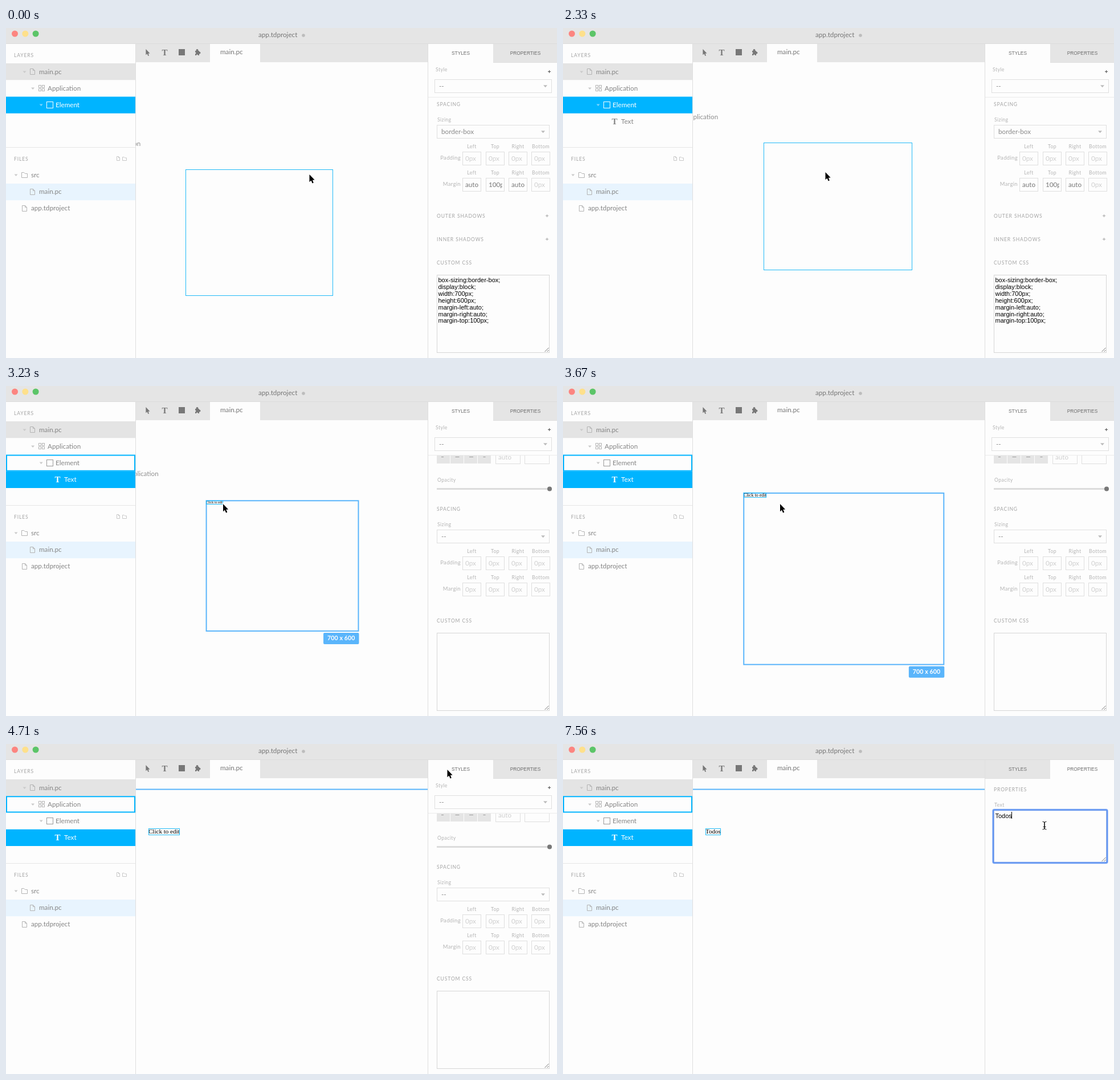
Animation, 967 px wide and 579 px high, one loop 8000 ms. Source, as an HTML page with a canvas:

```html
<!DOCTYPE html>
<html lang="en">
<head>
<meta charset="utf-8">
<title>Design editor</title>
<style>
html, body { margin: 0; width: 100%; height: 100%; overflow: hidden; background: #fdfdfd; }
canvas { display: block; }
</style>
</head>
<body>
<canvas id="stage" width="967" height="579"></canvas>
<script>
const c = document.getElementById('stage').getContext('2d');
const LOOP = 8000, TICK = 108;
const UI = 'Lato, "Open Sans", sans-serif';
const SANS = '"Liberation Sans", Arial, sans-serif';
const SERIF = '"Liberation Serif", Times, serif';
const BG = '#fdfdfd', BAR = '#e5e5e5', LINE = '#dfdfdf', INK = '#858585', PALE = '#b4b4b4';
const BLUE = '#00b4ff', PICK = '#22baf8', HOVER = '#5ab5fb';
const rowTop = i => 62 + 29.25 * i, ROW = 29.25;

// Moves: start, end, x, y
const pans = [[0, 0, 315, 248], [90, 90, 314, 250], [970, 1180, 352, 201]];
const pointerMoves = [
  [0, 0, 532, 257], [240, 440, 424, 344], [700, 700, 422, 343], [1800, 2150, 460, 253],
  [2590, 2590, 429, 254], [2740, 2740, 345, 193], [2840, 2940, 380.5, 207],
  [4370, 4710, 774, 45], [4890, 4890, 822, 49], [5040, 5130, 915, 59],
  [5490, 5690, 850, 135], [5780, 5780, 845, 143]
];

// Eased progress in screen refreshes; the first step shows at once
function progress(t, a, b) {
  if (t < a) return 0;
  if (t >= b) return 1;
  const n = Math.round((b - a) / TICK) + 1;
  const p = (Math.floor((t - a) / (b - a) * (n - 1)) + 1) / n;
  return p * p * (3 - 2 * p);
}

const pose = (moves, t) => moves.reduce(([x, y], [a, b, u, v]) => {
  const p = progress(t, a, b);
  return [x + (u - x) * p, y + (v - y) * p];
}, [0, 0]);

// The zoom grows around the pointer while the canvas drifts up and left
function view(t) {
  const [x, y] = pose(pans, t);
  const z = progress(t, 3230, 4030), q = progress(t, 4150, 4370), grow = 1.818 ** z;
  return {
    x: 380 + (x - 380) * grow - 102 * z * z + 23 * q,
    y: 207 + (y - 207) * grow - 46 * z * z - 2 * q,
    k: (t < 90 ? .37 : .373) * grow * (1 + .018 * q)
  };
}

function fill(x, y, w, h, color) {
  c.fillStyle = color;
  c.fillRect(x, y, w, h);
}

function box(x, y, w, h, color = LINE, lw = 1) {
  c.strokeStyle = color;
  c.lineWidth = lw;
  c.strokeRect(x + lw / 2, y + lw / 2, w - lw, h - lw);
}

function trace(points) {
  c.beginPath();
  points.forEach(([x, y]) => c.lineTo(x, y));
}

function shape(points, color) {
  trace(points);
  c.fillStyle = color;
  c.fill();
}

function line(points, color) {
  trace(points);
  c.strokeStyle = color;
  c.lineWidth = 1;
  c.stroke();
}

function dot(x, y, r, color) {
  c.fillStyle = color;
  c.beginPath();
  c.arc(x, y, r, 0, 7);
  c.fill();
}

function clipped(x, y, w, h, paint) {
  c.save();
  c.beginPath();
  c.rect(x, y, w, h);
  c.clip();
  paint();
  c.restore();
}

function text(s, x, y, color = INK, font = '11.7px ' + UI, gap = 0, align = 'left') {
  c.font = font;
  c.letterSpacing = gap + 'px';
  c.textAlign = align;
  c.fillStyle = color;
  c.fillText(s, x, y);
}

const heading = (s, x, y) => text(s, x, y + 3, '#a4a4a4', '8.5px ' + UI, .9);
const small = (s, x, y, align) => text(s, x, y + 3, PALE, '8.7px ' + UI, .4, align);
const code = (s, x, y) => text(s, x, y, '#000', '11px ' + SANS);
const bigT = (x, y, color) => text('T', x, y, color, 'bold 15px ' + SERIF, 0, 'center');

function plus(x, y, color) {
  fill(x - 2.5, y - .5, 5, 1, color);
  fill(x - .5, y - 2.5, 1, 5, color);
}

function caretDown(x, y, r = 3, color = '#cacaca') {
  shape([[x - r, y - r / 2], [x + r, y - r / 2], [x, y + r / 2 + .5]], color);
}

function pageIcon(x, y, w = 9, h = 11, color = PALE) {
  const r = x + w - .5, b = y + h - .5, f = w / 3;
  x += .5;
  y += .5;
  line([[r - f, y], [x, y], [x, b], [r, b], [r, y + f], [r - f, y], [r - f, y + f], [r, y + f]], color);
}

function folderIcon(x, y, w = 11, h = 10, color = PALE) {
  const r = x + w - .5, b = y + h - .5, f = h / 5;
  x += .5;
  y += .5;
  line([[x, y], [x + 2 * f, y], [x + 3 * f, y + f], [r, y + f], [r, b], [x, b], [x, y]], color);
}

function arrow(x, y, k, color) {
  c.save();
  c.translate(x, y);
  c.scale(k, k);
  trace([[.5, 0], [.5, 13.2], [3.5, 10.6], [5.6, 15.4], [7.8, 14.4], [5.8, 9.8], [9.6, 9.6]]);
  c.closePath();
  c.lineWidth = 1.6;
  c.strokeStyle = '#fff';
  if (k === 1) c.stroke();
  c.fillStyle = color;
  c.fill();
  c.restore();
}

function topBar() {
  fill(0, 0, 967, 27, BAR);
  fill(0, 27, 967, 1, '#dcdcdc');
  ['#fc8580', '#fee08b', '#5cc568'].forEach((color, i) => dot(15.5 + 18.3 * i, 10, 5.5, color));
  text('app.tdproject', 443, 16, '#777');
  dot(522, 13, 2.8, '#bdbdbd');
}

function toolbar() {
  const gray = '#777';
  fill(228, 28, 512, 32, BAR);
  fill(358, 28, 88, 32, BG);
  arrow(245, 37, .78, gray);
  bigT(278.5, 47.5, gray);
  fill(303, 37, 11, 11, gray);
  fill(332, 40, 7, 8, gray);
  dot(335.5, 39, 2, gray);
  dot(339.5, 43.5, 1.9, gray);
  dot(332, 44, 1.4, BAR);
  dot(335.5, 48, 1.4, BAR);
  text('main.pc', 376, 46, gray);
}

function sidebar(t, hover) {
  const onText = t >= 2420;
  fill(0, 28, 227, 551, BG);
  fill(227, 28, 1, 551, LINE);
  heading('LAYERS', 14, 48);
  fill(0, rowTop(0), 227, ROW, '#e4e4e4');
  fill(0, rowTop(onText ? 3 : 2), 227, ROW, BLUE);
  if (hover) box(0, rowTop(hover === 'app' ? 1 : 2), 227, ROW, BLUE, 2);

  for (let i = 0; i < 3; i++) {
    caretDown(32.5 + 14.6 * i, 77 + 29 * i, 3, i === 2 && !onText ? '#7fd6ff' : '#cacaca');
  }
  pageIcon(42, 71);
  text('main.pc', 58, 81);
  for (const x of [57, 63]) for (const y of [100, 106]) box(x, y, 5, 5, PALE);
  text('Application', 73, 110);
  box(71, 129, 12, 12, onText ? '#999' : '#fff');
  text('Element', 87, 139, onText ? INK : '#fff');
  if (t >= 2330) {
    const color = onText ? '#fff' : INK;
    bigT(90.5, 169, color);
    text('Text', 102, 168, color);
  }

  fill(0, 209, 227, 1, '#e6e6e6');
  heading('FILES', 14, 230);
  pageIcon(194, 225, 6, 8, '#c8c8c8');
  folderIcon(204, 226, 8, 7, '#c8c8c8');
  caretDown(17.5, 258);
  folderIcon(27, 253);
  text('src', 44, 262);
  fill(0, 273, 227, ROW, '#e8f4fe');
  pageIcon(42, 282);
  text('main.pc', 58, 291);
  pageIcon(28, 311);
  text('app.tdproject', 44, 320);
}

function outline(x, y, w, h) {
  const label = w > h * 1.5 ? '1440 x 900' : '700 x 600';
  box(x - .5, y - .5, w + 1, h + 1, HOVER, 2);
  c.font = 'bold 10.6px ' + UI;
  c.letterSpacing = '.1px';
  const bw = c.measureText(label).width + 14, left = x + w + .5 - bw;
  c.fillStyle = HOVER;
  c.beginPath();
  c.roundRect(left, y + h + 2.5, bw, 20, 2);
  c.fill();
  text(label, left + 7, y + h + 16, '#fff', 'bold 10.6px ' + UI, .1);
}

function canvasArea(t, hover, copy) {
  const { x: vx, y: vy, k } = view(t);
  const x = Math.round(vx), y = Math.round(vy);
  const left = vx - 370 * k, top = vy - 100 * k;
  text('Application', left, top - 4, '#8f8f8f');
  if (t < 2420) box(x, y, Math.round(700 * k), Math.round(600 * k), PICK);
  if (hover === 'app') outline(left, top, 1440 * k, 900 * k);
  if (hover === 'element') outline(vx, vy, 700 * k, 600 * k);
  if (t >= 2420) {
    c.save();
    c.translate(x, y);
    c.scale(k, k);
    text(copy, 0, 13.4, '#000', '16px ' + SERIF);
    const width = c.measureText(copy).width * k;
    c.restore();
    box(x, y, Math.round(width), Math.round(17 * k), PICK);
  }
}

function select(value, x, y, w) {
  box(x, y, w, 24);
  text(value, x + 8, y + 16, '#8a8a8a');
  caretDown(x + w - 11.5, y + 12, 3.5, '#bbb');
}

function area(y, h) {
  box(756, y, 198, h, '#d6d6d6');
  for (const d of [3, 7]) line([[952.5 - d, y + h - 2], [952.5, y + h - 2 - d]], '#777');
}

function sides(name, y, values) {
  ['Left', 'Top', 'Right', 'Bottom'].forEach((side, i) => {
    const x = Math.round(801.3 + 40.2 * i), value = values[i];
    small(side, x + 16.5, y, 'center');
    box(x, y + 9, 33, 24);
    clipped(x + 4, y + 10, 25, 22, () => text(value || '0px', x + 5, y + 25, value ? '#777' : '#cfcfcf'));
  });
  text(name, 798, y + 23, PALE, '9.4px ' + UI, .4, 'right');
}

function spacing(y, sizing, margin) {
  heading('SPACING', 756, y);
  small('Sizing', 757, y + 27);
  select(sizing, 756, y + 36, 198);
  sides('Padding', y + 74, []);
  sides('Margin', y + 120, margin);
}

function elementStyles() {
  spacing(134, 'border-box', ['auto', '100px', 'auto']);
  ['OUTER', 'INNER'].forEach((kind, i) => {
    heading(kind + ' SHADOWS', 756, 330 + 41 * i);
    plus(949.5, 329.5 + 41 * i, '#aaa');
  });
  ['box-sizing:border-box', 'display:block', 'width:700px', 'height:600px',
    'margin-left:auto', 'margin-right:auto', 'margin-top:100px']
    .forEach((rule, i) => code(rule + ';', 758.5, 446 + i * 11.9));
}

function textStyles() {
  clipped(741, 122, 226, 20, () => {
    for (let i = 0; i < 4; i++) {
      fill(756 + 24 * i, 122, 23, 14, BAR);
      fill(764 + 24.5 * i, 124, i % 3 ? 7 : 4, 1, '#999');
    }
    box(859, 112, 44, 25);
    box(910, 112, 44, 25);
    text('auto', 864, 129, '#cfcfcf');
  });
  small('Opacity', 757, 165);
  fill(756, 179, 198, 3, '#dcdcdc');
  dot(954, 180.5, 4, '#777');
  spacing(216, '--', []);
}

function stylesPanel(t) {
  small('Style', 754, 73);
  plus(953.5, 76.5, '#555');
  select('--', 752, 90, 206);
  fill(741, 121, 226, 1, '#ebebeb');
  heading('CUSTOM CSS', 756, 412);
  area(433, 137);
  if (t < 2420) elementStyles();
  else textStyles();
}

function propertiesPanel(t, copy) {
  const focus = t >= 5870, marked = t >= 6140 && t < 7130;
  heading('PROPERTIES', 756, 80);
  small('Text', 757, 107);
  area(116, 92);
  if (focus) {
    c.beginPath();
    c.roundRect(755, 115.5, 200, 93, 2);
    for (const [color, lw] of [['rgba(92,146,243,.35)', 4], ['#6295f2', 2.4]]) {
      c.strokeStyle = color;
      c.lineWidth = lw;
      c.stroke();
    }
  }
  c.font = '11px ' + SANS;
  c.letterSpacing = '0px';
  const edge = s => 758.5 + c.measureText(s).width;
  const end = edge(copy);
  if (marked) {
    const from = edge(t < 6230 ? 'Click to ' : '');
    fill(from, 119, end - from, 12, '#b3d7fe');
  }
  code(copy, 758.5, 129.5);
  if (focus && !marked) fill(Math.round(end - .5), 119, 1, 12, '#000');
}

function rightPanel(t, copy) {
  const props = t >= 5310;
  const tab = props ? 741 : 855;
  fill(740, 28, 227, 551, BG);
  fill(740, 28, 1, 551, LINE);
  fill(tab, 28, 114, 32, BAR);
  fill(tab, 60, 114, 1, LINE);
  ['STYLES', 'PROPERTIES'].forEach((s, i) =>
    text(s, 798 + 113.5 * i, 46.5, '#6c6c6c', '8.3px ' + SANS, 0, 'center'));
  if (props) propertiesPanel(t, copy);
  else stylesPanel(t);
}

function beam(x, y) {
  const ink = '#111';
  fill(x - .8, y - 6, 1.6, 12, ink);
  fill(x - 2.5, y + 1.8, 5, 1, ink);
  for (const d of [-1, 1]) {
    line([[x - 3.5, y + d * 7], [x, y + d * 5.8], [x + 3.5, y + d * 7]], ink);
  }
}

function pointer(t) {
  const [x, y] = pose(pointerMoves, t);
  if (t > 5490 && y > 116) beam(Math.round(x), Math.round(y));
  else arrow(x, y, 1, '#000');
}

function hovered(t) {
  if (t < 2740) return '';
  return t < 2840 || t >= 4480 ? 'app' : 'element';
}

function typed(t) {
  if (t < 7130) return 'Click to edit';
  return 'Todos'.slice(0, t < 7300 ? 1 : 2 + Math.floor((t - 7300) / 86));
}

function draw() {
  const t = performance.now() % LOOP;
  const hover = hovered(t), copy = typed(t);
  fill(0, 0, 967, 579, BG);
  clipped(228, 60, 512, 519, () => canvasArea(t, hover, copy));
  topBar();
  toolbar();
  sidebar(t, hover);
  rightPanel(t, copy);
  pointer(t);
  requestAnimationFrame(draw);
}
draw();
</script>
</body>
</html>
```
